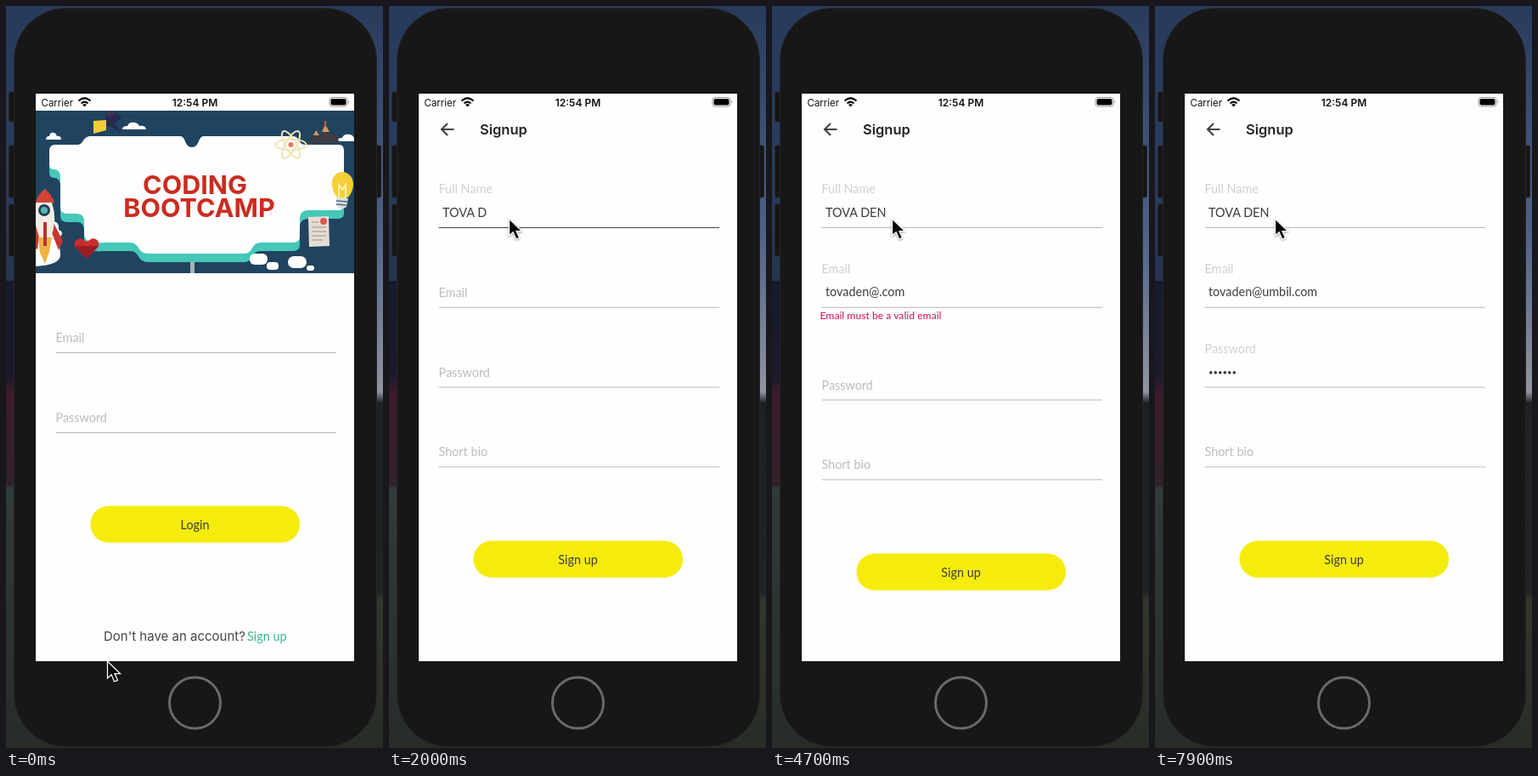
Animation of 444 by 872 pixels, one loop 8000 ms. Source, as an HTML page:

```html
<!DOCTYPE html>
<html lang="en">
<head>
<meta charset="utf-8">
<title>Signup form</title>
<style>
  html, body { margin: 0; width: 100%; height: 100%; overflow: hidden; background: #171717; }
  svg { display: block; width: 100%; height: 100%; }
  text { font: 14.4px Lato, sans-serif; white-space: pre; }
  .ui { font-family: Inter, sans-serif; fill: #111; }
  .title { font-size: 30.5px; font-weight: 700; text-anchor: middle; fill: #cb2c20; }
  .mid { text-anchor: middle; fill: #3d3d3d; }
  .label { fill: #bcbcbc; }
  .label.up { fill: #d0d0d0; }
  .line { stroke: #b8b8b8; }
  .line.on { stroke: #444; }
  .value { fill: #3c3c3c; }
  .button { fill: #f5ec0c; filter: drop-shadow(0 1px 1px #f5ec0c44); }
</style>
</head>
<body>
<svg viewBox="0 0 444 872" preserveAspectRatio="none">
  <defs>
    <linearGradient id="left" x2="0" y2="1">
      <stop stop-color="#283b5c"/><stop offset=".2" stop-color="#2a3c5e"/>
      <stop offset=".37" stop-color="#26344f"/><stop offset=".37" stop-color="#151b2d"/>
      <stop offset=".5" stop-color="#1b1a2c"/><stop offset=".52" stop-color="#3d1b2d"/>
      <stop offset=".645" stop-color="#30202a"/><stop offset=".65" stop-color="#303b39"/>
      <stop offset="1" stop-color="#272c29"/>
    </linearGradient>
    <linearGradient id="right" x2="0" y2="1">
      <stop stop-color="#283b5c"/><stop offset=".3" stop-color="#4d6088"/>
      <stop offset=".52" stop-color="#92949f"/><stop offset=".535" stop-color="#1d2124"/>
      <stop offset=".79" stop-color="#1f2323"/><stop offset=".8" stop-color="#32372b"/>
      <stop offset="1" stop-color="#282c27"/>
    </linearGradient>
    <clipPath id="screen"><path d="M35 103H410V770H35z"/></clipPath>
    <clipPath id="bannerClip"><path d="M35 123H410V314H35z"/></clipPath>
    <path id="board" d="M100 153H205C212 153 210 166 219 166S226 153 233 153H338C346 153 344 163 352 163H392Q398 163 398 170V234Q398 240 390 240H356Q346 240 346 250V270Q346 278 338 278H300C288 278 292 291 280 291H168C154 291 158 278 146 278H116Q92 280 92 268V254Q92 244 84 244H72Q64 244 64 236V202Q64 192 57 192Q51 192 51 186V170Q51 163 58 163H84C92 163 90 153 100 153z"/>
    <path id="cloud" d="M0 9Q0 5 6 5Q8 0 14 1Q18 1 20 5Q27 4 28 9z" fill="#fff"/>
  </defs>

  <path d="M0 0H222V872H0z" fill="url(#left)"/>
  <path d="M222 0H444V872H222z" fill="url(#right)"/>
  <g fill="#151515" stroke="#252525">
    <rect x="3.5" y="101" width="9" height="35" rx="2"/>
    <rect x="3.5" y="164" width="9" height="61" rx="2"/>
    <rect x="3.5" y="233" width="9" height="61" rx="2"/>
    <rect x="433" y="164" width="8.5" height="61" rx="2"/>
    <rect x="9.5" y="2.5" width="427" height="868" rx="61" fill="#171717"/>
  </g>
  <circle cx="222.5" cy="819" r="30" fill="none" stroke="#6a6a6a" stroke-width="3"/>

  <g clip-path="url(#screen)">
    <path d="M35 103H410V770H35z" fill="#fefefe"/>
    <g id="login">
      <g clip-path="url(#bannerClip)">
        <path d="M35 123H410V314H35z" fill="#204460"/>
        <path d="M217 295H222V314H217z" fill="#a9b4b9"/>
        <use href="#board" y="10" fill="#45c8b8"/>
        <use href="#board" fill="#fefefe"/>
        <use href="#cloud" x="137" y="136"/>
        <use href="#cloud" transform="translate(47 148) scale(.65 1)"/>
        <use href="#cloud" x="390" y="150"/>
        <g fill="#fff">
          <path d="M35 268Q42 248 56 253Q63 254 62 263Q70 266 62 273L64 291Q66 304 35 306z"/>
          <rect x="287" y="291" width="21" height="13" rx="6"/>
          <rect x="307" y="301" width="14" height="9" rx="4"/>
          <rect x="332" y="294" width="22" height="14" rx="7"/>
          <rect x="354" y="305" width="9" height="6" rx="3"/>
        </g>
        <!-- reader with a laptop -->
        <path d="M117 129L128 125L137 131L128 138L137 150L126 143L117 141z" fill="#282a54"/>
        <circle cx="123" cy="126" r="4" fill="#403253"/>
        <path d="M103 135L118 134V146L103 150z" fill="#f1cd38"/>
        <!-- atom -->
        <g fill="none" stroke="#efe5b8" stroke-width="2">
          <ellipse cx="335.5" cy="163" rx="18" ry="6.5"/>
          <ellipse cx="335.5" cy="163" rx="18" ry="6.5" transform="rotate(60 335.5 163)"/>
          <ellipse cx="335.5" cy="163" rx="18" ry="6.5" transform="rotate(120 335.5 163)"/>
          <circle cx="335.5" cy="163" r="3" fill="#e97861" stroke="none"/>
        </g>
        <!-- mountains -->
        <path d="M357 161L365 146L370 152L376 139L383 152L387 147L393 161z" fill="#3d3c43"/>
        <path d="M362 152L365 146L369 152zM372 148L376 139L381 148z" fill="#d99562"/>
        <path d="M376 135V142" stroke="#e9523f" stroke-width="2"/>
        <!-- bulb -->
        <path d="M390 225C378 210 385 195 396 195S415 210 403 225z" fill="#f6cf39"/>
        <path d="M392 210L396 216L400 210V226H392z" fill="none" stroke="#fff1a8" stroke-width="2"/>
        <path d="M389 225L403 226L401 236Q395 241 389 235z" fill="#d9dfe0"/>
        <path d="M389 229L402 230M389 233L401 234" stroke="#536c7a" stroke-width="1.5"/>
        <!-- paper -->
        <path d="M356 248L380 247L381 282L357 283z" fill="#e5ddd3"/>
        <path d="M360 254H368M360 260H377M360 265H377M360 270H377M360 275H373" stroke="#b6aaa4" stroke-width="1.5"/>
        <circle cx="374" cy="253" r="4" fill="#d75b4f"/>
        <!-- heart -->
        <path d="M95 297L81 283Q79 274 88 273L95 277L102 273Q111 274 109 283z" fill="#c92c2a"/>
        <path d="M81 282H109L95 297z" fill="#991e26"/>
        <!-- rocket -->
        <path d="M36 253L28 282L37 286L41 258zM55 253L67 276L62 287L51 259z" fill="#c93632"/>
        <path d="M46 215Q29 230 35 258L39 272H53Q64 242 46 215z" fill="#f0eee4"/>
        <path d="M46 215Q37 222 35 231H57Q55 223 46 215z" fill="#d44436"/>
        <circle cx="45" cy="240" r="7" fill="#293d53"/><circle cx="45" cy="240" r="4" fill="#55b7ba"/>
        <path d="M38 272H54L51 289L46 303L40 290z" fill="#eeb344"/>
        <path d="M46 254V282" stroke="#bb302e" stroke-width="4"/>
        <text class="ui title" x="222.5" y="220.5">CODING</text>
        <text class="ui title" x="227.5" y="248">BOOTCAMP</text>
      </g>
      <text class="label" x="58.5" y="395">Email</text>
      <path class="line" d="M58.5 407.5H389"/>
      <text class="label" x="58.5" y="488.5">Password</text>
      <path class="line" d="M58.5 501.5H389"/>
      <rect class="button" x="99.5" y="587.5" width="246.5" height="43" rx="21.5"/>
      <text class="mid" x="222.5" y="614.5">Login</text>
      <text class="ui" x="115" y="745.5" style="font-size:15px;fill:#444">Don't have an account?</text>
      <text x="284" y="745.5" fill="#35b88f">Sign up</text>
    </g>

    <g id="signup">
      <path d="M35 123H410V770H35z" fill="#fefefe"/>
      <path d="M76.5 145H62.5M69 138L62 145L69 152" fill="none" stroke="#444" stroke-width="2.2"/>
      <text class="ui" x="107" y="151" style="font-size:16.5px;font-weight:600;fill:#222">Signup</text>
      <g id="fields"></g>
      <text id="error" x="56.5" y="367.5" fill="#d6104d" style="font-size:12.2px">Email must be a valid email</text>
      <g id="submit">
        <rect class="button" x="99.5" y="628.5" width="246.5" height="43" rx="21.5"/>
        <text class="mid" x="222.5" y="655.5">Sign up</text>
      </g>
    </g>

    <path d="M35 103H410V123H35z" fill="#fefefe"/>
    <text class="ui" x="41.5" y="117.5" style="font-size:11.5px">Carrier</text>
    <text class="ui" x="222.5" y="117.5" style="font-size:12px;font-weight:600;text-anchor:middle">12:54 PM</text>
    <g fill="none" stroke="#111" stroke-width="2.2">
      <path d="M85.5 111.5Q92.5 105 99.5 111.5M88.5 114.5Q92.5 111 96.5 114.5"/>
      <path d="M92.5 118.5L90 116Q92.5 114 95 116z" fill="#111" stroke="none"/>
    </g>
    <rect x="381" y="107.5" width="21" height="10.5" rx="3" fill="none" stroke="#999"/>
    <rect x="382.5" y="109" width="18" height="7.5" rx="1.8"/>
    <path d="M403.5 111Q405.5 112.7 403.5 114.5z" fill="#999"/>
  </g>
  <path id="cursor" d="M0 0V20L4.6 15.8L8.2 24L12 22.3L8.5 14.6H15z" fill="#080808" stroke="#fff" stroke-width="1.3" style="filter:drop-shadow(0 1px 1px #0006)"/>
</svg>

<script>
const LOOP = 8000, STEP = 100;
const $ = id => document.getElementById(id);
const clamp = x => Math.max(0, Math.min(1, x));
const ease = x => { x = clamp(x); return x * x * (3 - 2 * x); };
const between = (t, a, b) => t >= a && t < b;
const keys = (t, start, gap, max) =>
  Math.max(0, Math.min(max, Math.floor((t - start) / gap) + 1));
const move = (el, x, y) => el.setAttribute("transform", `translate(${x} ${y})`);

function add(tag, parent, attrs) {
  const el = document.createElementNS("http://www.w3.org/2000/svg", tag);
  for (const k in attrs) el.setAttribute(k, attrs[k]);
  return parent.appendChild(el);
}

const fields = ["Full Name", "Email", "Password", "Short bio"].map((name, i) => {
  const g = add("g", $("fields"), {});
  const label = add("text", g, { class: "label", x: 58.5, y: 248 });
  label.textContent = name;
  return {
    y: i * 93.75, g, label,
    line: add("path", g, { class: "line", d: "M58.5 260.5H389" }),
    value: add("text", g, { class: "value", x: 63, y: 247.5 }),
    caret: add("rect", g, { y: 232, width: 2, height: 19, fill: "#4656e8" })
  };
});
fields[2].value.style.fontSize = "9.5px";
fields[2].value.setAttribute("y", 246.5);

function drawField(f, t, { text = "", at = text.length, focus = LOOP, spans = [], shift = 0 }) {
  const span = spans.find(([a, b]) => between(t, a, b));
  const lift = ease((t - focus) / 100);
  move(f.g, 0, f.y + shift);
  move(f.label, 0, -28 * lift);
  f.label.classList.toggle("up", lift > .5);
  f.line.classList.toggle("on", !!span);
  f.value.textContent = text;
  const shown = span ? t - span[0] - 200 : -1;
  f.caret.style.display = shown >= 0 && shown % 1000 < 600 ? "" : "none";
  f.caret.setAttribute("x", 63 + (at ? f.value.getSubStringLength(0, at) : 0));
}

function emailState(t) {
  const typed = keys(t, 2900, 150, 8) + keys(t, 4200, 80, 4);
  const extra = keys(t, 5650, 150, 5);
  const base = "tovaden@.com".slice(0, typed);
  const text = extra ? "tovaden@" + "umbil".slice(0, extra) + ".com" : base;
  const at = text.length - keys(t, 5300, 100, 4);
  return { text, at, focus: 2600, spans: [[2600, 4600], [5200, 6600]] };
}

function draw(t) {
  const slide = ease((t - 400) / 400);
  move($("login"), -112 * slide, 0);
  move($("signup"), 375 * (1 - slide), 0);

  const toLink = ease(t / 300), toField = ease((t - 700) / 400);
  move($("cursor"), 119.5 + 182 * toLink - 160 * toField, 770 - 30 * toLink - 490 * toField);

  const invalid = between(t, 4600, 5650), shift = invalid ? 15 : 0;
  $("error").style.display = invalid ? "" : "none";
  move($("submit"), 0, shift);

  drawField(fields[0], t, {
    text: "TOVA DEN".slice(0, keys(t, 1400, 120, 8)), focus: 1200, spans: [[1200, 2600]]
  });
  const email = emailState(t);
  // the label is fully raised one step after focus
  drawField(fields[1], t, email);
  drawField(fields[2], t, {
    text: "•".repeat(keys(t, 6800, 120, 6)), focus: 6600, spans: [[6600, 7700]], shift
  });
  drawField(fields[3], t, { shift });
}

const start = performance.now();
function tick() {
  const t = (performance.now() - start) % LOOP;
  draw(Math.floor(t / STEP) * STEP);
  requestAnimationFrame(tick);
}
tick();
</script>
</body>
</html>
```
